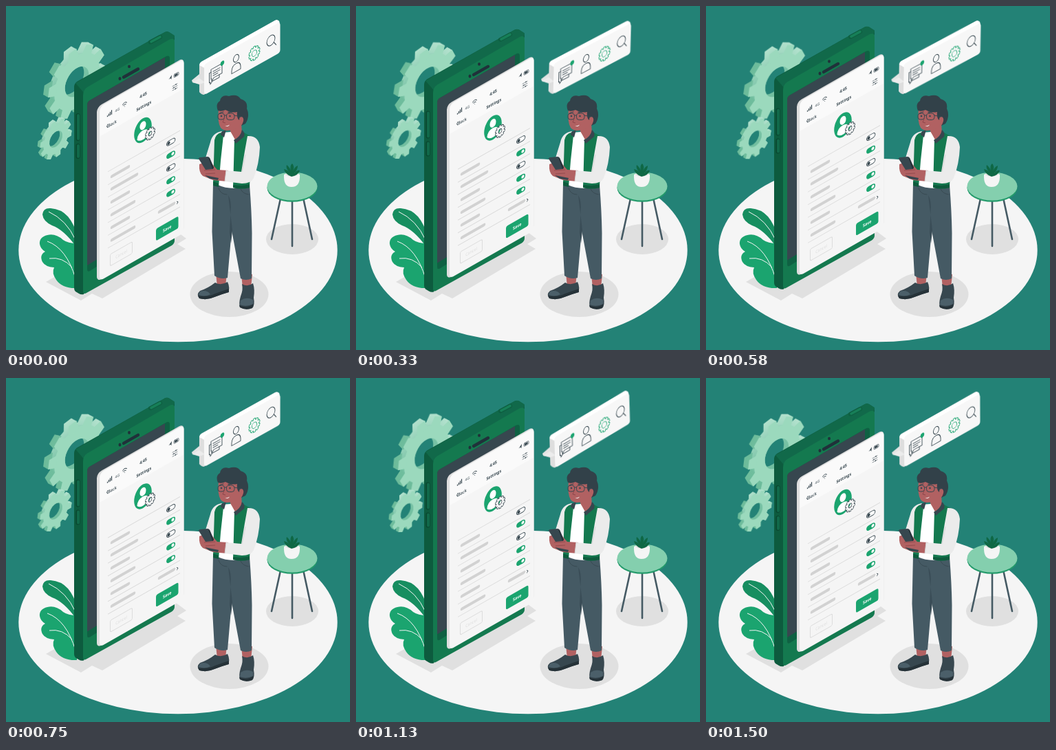
Write an HTML page without scripts that moves like this. It is 500x500 px and loops after 1.54 s.

```html
<!DOCTYPE html>
<html lang="en">
<head>
<meta charset="utf-8">
<title>Phone settings</title>
<style>
html, body { margin: 0; width: 100%; height: 100%; overflow: hidden; background: #238276; }
svg { display: block; width: 100vw; height: 100vh; }
text { font-family: "Open Sans", Lato, sans-serif; font-size: 6.2px; font-weight: 700; text-anchor: middle; fill: #37474f; }
.float { animation: float 770ms cubic-bezier(.37, 0, .63, 1) -12ms infinite alternate; }
.sway { animation: sway 770ms cubic-bezier(.37, 0, .63, 1) -385ms infinite alternate; }
.gears { transform-origin: 99px 137px; }
.bubble { transform-origin: 336px 75px; }
@keyframes float { to { transform: translateY(-8.6px); } }
@keyframes sway { from { transform: rotate(-1.6deg); } to { transform: rotate(1.6deg); } }
.line { fill: none; stroke: #37474f; stroke-linecap: round; stroke-linejoin: round; }
.skin { fill: #b16162; }
.dark { fill: #37474f; }
.green { fill: #1ba46f; }
.shade { fill: #e0e0e0; }
</style>
</head>
<body>
<svg viewBox="0 0 500 500">
<defs>
  <linearGradient id="mint" gradientUnits="userSpaceOnUse" x1="0" y1="-48" x2="0" y2="48">
    <stop stop-color="#b2e1cd"/><stop offset=".5" stop-color="#78c2a5"/><stop offset="1" stop-color="#6cbb9a"/>
  </linearGradient>
  <path id="ring" fill-rule="evenodd" d="M0-38a38 38 0 1 1 0 76a38 38 0 1 1 0-76ZM0-20a20 20 0 1 0 0 40a20 20 0 1 0 0-40Z"/>
  <path id="tooth" d="M-9-34-6.500-48H6.500L9-34ZM-9 34-6.500 48H6.500L9 34Z"/>
  <g id="cog">
    <use href="#ring"/><use href="#tooth"/>
    <use href="#tooth" transform="rotate(36)"/><use href="#tooth" transform="rotate(72)"/>
    <use href="#tooth" transform="rotate(108)"/><use href="#tooth" transform="rotate(144)"/>
  </g>
  <g id="isoCog" transform="matrix(.866 -.5 0 1 0 0)"><use href="#cog" transform="rotate(-9)"/></g>
  <g id="slab2"><use href="#isoCog"/><use href="#isoCog" x="-1" y="-.55"/></g>
  <g id="slab4"><use href="#slab2"/><use href="#slab2" x="-2" y="-1.1"/></g>
  <g id="slab8"><use href="#slab4"/><use href="#slab4" x="-4" y="-2.2"/></g>
  <g id="gear"><use href="#slab8" fill="url(#mint)"/><use href="#isoCog" fill="#9bd9bd"/></g>
  <g id="cogIcon">
    <use href="#cog" stroke="currentColor" stroke-width="10"/>
    <use href="#cog" fill="#f7f7f7"/>
  </g>
  <g id="toggleOff">
    <rect x="-6" y="-3.3" width="12.4" height="6.600" rx="3.3" fill="#fff" stroke="#37474f" stroke-width=".9"/>
    <ellipse cx="-3" rx="2.1" ry="2.3" class="dark"/>
  </g>
  <g id="toggleOn">
    <rect x="-6.4" y="-3.8" width="13" height="7.6" rx="3.8" class="green"/>
    <ellipse cx="3" rx="2.1" ry="2.3" fill="#fff"/>
  </g>
</defs>

<rect width="500" height="500" fill="#238276"/>
<ellipse cx="250" cy="355" rx="231.700" ry="133.200" fill="#f5f5f5"/>
<g class="shade">
  <path d="M58 401 100 377 246 326 262 338 249 346 261 353 140 425 125 418 109 428Z"/>
  <ellipse cx="324.500" cy="419" rx="57" ry="33"/>
  <ellipse cx="416" cy="339" rx="38" ry="22"/>
</g>

<g class="sway gears">
  <use href="#gear" transform="translate(103 110)"/>
  <use href="#gear" transform="translate(72.500 193.500) scale(.55)"/>
</g>

<g id="leaves">
  <path fill="#178e60" d="M102 350Q84 325 67 319Q54 313 53 303Q54 293 65 294Q80 295 90 306Q100 318 103 334Z"/>
  <path class="green" d="M103 345Q90 345 83 340Q72 330 60 333Q48 336 49 346Q50 353 57 357Q48 362 53 372Q57 379 70 380Q66 388 73 398Q82 411 103 410Z"/>
  <path d="M62 299Q88 311 101 340M60 342Q88 352 101 396M63 367Q82 364 96 380" fill="none" stroke="#f5f5f5"/>
</g>

<g class="float">
  <path d="M99 118Q99 113 103 110L229 39Q233 36 237 38L243 42Q245 43 245 48L113 419Q109 420 106 418L101 415Q99 413 99 410Z" fill="#0d5b3e"/>
  <path d="M101 112 229 39Q233 36 237 38L245 43 244 50 113 126Z" fill="#11694a"/>
  <path d="M112 130Q112 122 118 118L237 49Q245 45 245 53V341Q245 345 241 348L117 417Q112 420 112 414Z" fill="#14794f"/>
  <path d="M118 144Q118 139 122 137L233 73Q238 71 238 76V312L122 385Q118 387 118 383Z" fill="#0f6143"/>
  <path d="M118 144Q118 139 122 137L231 74.500V308L118 377Z" fill="#37474f"/>
  <g class="line">
    <path d="M171 103.500 192 91.500" stroke="#20313a" stroke-width="4.400"/>
    <path d="M210 52.500 224 45" style="stroke:#0e5f41" stroke-width="6"/>
    <path d="M211 52 224 45" style="stroke:#177f58" stroke-width="3.600"/>
    <path d="M104.500 159V193M104.500 203V219" style="stroke:#0a4730" stroke-width="6"/>
    <path d="M105 159V193M105 203V219" style="stroke:#11694a" stroke-width="4"/>
  </g>
  <g fill="#20313a"><ellipse cx="165.500" cy="105.500" rx="2" ry="2.500"/><ellipse cx="179" cy="88" rx="2" ry="2.300"/></g>

  <g transform="matrix(1 -.57 0 1 132 0)">
    <rect y="147" width="126.500" height="254" rx="7" fill="#dedede"/>
    <rect x="4" y="149" width="122.500" height="253" rx="6" fill="#f5f5f5"/>
    <path d="M5 192V155Q5 149 11 149H120Q126 149 126 155V192Z" fill="#fafafa"/>
    <path d="M15.500 170V168M17.500 170V166.500M19.500 170V165M21.500 170V163.500" class="line" stroke-width="1.200" style="stroke-linecap:butt"/>
    <text x="30" y="170" style="font-size:5.200px;font-weight:400">4G</text>
    <path d="M37.500 165Q40.500 161.500 43.500 165M38.800 167Q40.500 165.300 42.200 167M40.500 169V169" class="line" stroke-width=".9"/>
    <path d="M104.500 166.500 109 162.500 108.300 168.500 107 166Z" class="dark"/>
    <rect x="112" y="163.500" width="7" height="4.600" rx="1.300" class="line" stroke-width=".6"/>
    <rect x="113" y="164.300" width="4.600" height="3" class="dark"/>
    <path d="M110 179.500H117M110 182.500H117M110 185.500H117" class="line" stroke-width=".5"/>
    <path d="M115 179V180M112 182V183M114.500 185V186" class="line" stroke-width="1.100"/>
    <path d="M16 181 14.600 183.300 16 185.600" class="line" stroke-width=".9"/>
    <g transform="scale(.866 1)">
      <text x="78" y="170">4:45</text>
      <text x="78.800" y="186.300">Settings</text>
      <text x="26" y="186" style="font-weight:600">Back</text>
    </g>

    <ellipse cx="67" cy="218.700" rx="12.800" ry="17.300" class="green"/>
    <ellipse cx="67" cy="212" rx="4.500" ry="6" fill="#fff"/>
    <path d="M58.500 228Q59 219 67 219Q75 219 75.500 228Q72 232.500 67 232.500Q62 232.500 58.500 228Z" fill="#fff"/>
    <use href="#cogIcon" transform="translate(77.500 229.500) scale(.14 .17)" color="#37474f"/>

    <path d="M16 250H121M16 269H121M16 287H121M16 305.500H121M16 324H121M16 342.500H121M16 361H121" stroke="#d8d8d8" stroke-width=".9"/>
    <path d="M22 260H46M22 278H58M22 297H46M22 315.500H54M22 334H46M22 352.500H54M91 351H112" class="line" style="stroke:#d2d2d2" stroke-width="4.500"/>
    <use href="#toggleOff" x="107.500" y="259"/>
    <use href="#toggleOn" x="107.500" y="277.500"/>
    <use href="#toggleOff" x="107.500" y="296"/>
    <use href="#toggleOn" x="107.500" y="314.500"/>
    <use href="#toggleOn" x="107.500" y="333"/>
    <path d="M116.500 350.500 118 352.300 116.500 354" class="line" stroke-width=".8"/>
    <rect x="86" y="373" width="32.500" height="17.500" rx="2.500" class="green"/>
    <rect x="19.500" y="372" width="32" height="17" rx="2" fill="none" stroke="#dcdcdc"/>
    <g transform="scale(.866 1)">
      <text x="118" y="384" style="fill:#fff">Save</text>
      <text x="41" y="383" style="fill:#dcdcdc;font-weight:400">Cancel</text>
    </g>
  </g>
</g>

<g class="sway bubble">
  <path d="M281 99 270 108 271 111 281 113Z" fill="#e4e4e4"/>
  <path d="M281 86Q281 83 284 81L391 21Q394 19 397 22L398 27 288 129Q284 129 281 125Z" fill="#dedede"/>
  <path d="M281 86Q281 83 284 81L391 21Q394 19 397 22L398 27 290 91Z" fill="#fff"/>
  <path d="M271 111 281 105 289 111 281 114Z" fill="#ececec"/>
  <g transform="matrix(1 -.56 0 1 288 0)">
    <rect y="85" width="110.500" height="44.500" rx="4" fill="#f7f7f7"/>
    <g class="line" stroke-width=".9">
      <path d="M10 98H26V112H14L11 116V112H10Z"/>
      <path d="M10 102H7.500V116H9V119L12 116H22V112M13 102.500H23M13 105.500H23M13 108.500H20"/>
      <ellipse cx="46.500" cy="102" rx="4" ry="5.200"/>
      <path d="M40 121V117Q40.500 109.500 46.500 109.500Q52.500 109.500 53 117V121Z"/>
      <ellipse cx="97" cy="104.300" rx="6" ry="7.200"/><path d="M101.300 109.500 104.700 115"/>
    </g>
    <ellipse cx="26.500" cy="98" rx="2.800" ry="3.300" class="green"/>
    <use href="#cogIcon" transform="translate(73 109.500) scale(.16 .195)" color="#1ba46f"/>
    <ellipse cx="73" cy="109.500" rx="3.600" ry="4.300" fill="#f7f7f7" stroke="#1ba46f" stroke-width=".8"/>
  </g>
</g>

<g id="table">
  <path d="M399 280 386 339M416 282V349M432 279 445 339" class="line" style="stroke:#455a64" stroke-width="2.600"/>
  <ellipse cx="416" cy="264.300" rx="36.500" ry="20.500" fill="#249b6b"/>
  <ellipse cx="416" cy="262" rx="36.500" ry="20.500" fill="#84cfae"/>
  <path d="M404 245Q415 238 427 245Q428 263 415 263Q403 263 404 245Z" fill="#f5f5f5"/>
  <path d="M406 245Q415 240 425 245Q415 251 406 245Z" fill="#d9d9d9"/>
  <path d="M415 248Q405 244 404 237Q409 238 412 242Q406 235 408 231Q413 235 414 240Q412 232 416 229Q420 233 417 241Q419 234 424 232Q424 238 419 243Q424 238 427 239Q425 246 415 248Z" fill="#0f6845"/>
</g>

<g id="man">
  <path class="skin" d="M305 388H321L319 408H307ZM342 390H358L356 410H344Z"/>
  <g class="dark">
    <path d="M304 402Q312 407 322 401Q326 409 323 416Q313 419 303 423Q292 428 281 425Q276 419 282 414Q294 410 304 402Z"/>
    <path d="M343 404Q351 409 359 403Q362 412 360 424Q362 435 358 439Q349 443 340 438Q338 432 341 422Q345 412 343 404Z"/>
  </g>
  <path d="M279 421Q292 424 304 418 315 414 324 411V416Q313 419 303 423Q292 428 281 425ZM339 435Q350 440 360 433L358 439Q349 443 340 438Z" fill="#263238"/>
  <path d="M282 415Q292 412 297 419Q290 423 280 420ZM341 428Q349 422 359 427L359 433Q349 438 340 434Z" fill="#4b5f69"/>
  <path d="M301 258 354 260Q357 298 357.500 330L357 396Q349 400 341 396L328 326 322 395Q312 398 303 392L299.500 328Z" fill="#455a64"/>
  <path d="M323 275Q328 282 326.500 300L325 330 327 345 329 326Z" fill="#3a4d57"/>
  <path d="M309 265Q312 274 321 274M341 266Q344 273 353 274" class="line" stroke-width=".8"/>

  <path d="M314 182Q300 184 297 198L289 224 298 238 308 230 316 194Z" fill="#ebebeb"/>
  <path d="M314 184 340 182 345 264Q322 267 308 260Z" fill="#fff"/>
  <path d="M312 184Q305 186 303 195L301 260 309 263 312 225 316 188ZM332 194 346 184 357 190 354 264Q342 267 330 264Z" fill="#14794f"/>
  <path d="M301 255 309 258V263L301 261ZM330 260Q343 262 354 259V264Q342 267 330 264Z" fill="#0e5b3d"/>
  <path class="skin" d="M327 168H342L343 188 334 196 326 182Z"/>
  <path class="dark" d="M343 180Q348 184 346 190L334 200 331 195Q341 190 343 180ZM313 183 320 180 317 191 312 187Z"/>

  <path class="skin" d="M281 230Q280 242 286 247L301 253 321 255 323 239 307 238 300 230 289 227Z"/>
  <path d="M351 189Q367 188 369 205Q368 230 360 250Q356 258 343 258L318 255 320 239 342 241 347 211Z" fill="#ebebeb"/>
  <path d="M343 241 348 216M320 239 318 255" fill="none" stroke="#d5d5d5"/>
  <path class="dark" d="M280 222Q280 220 283 220L293 219Q295 219 296 221L302 235Q302 237 300 237L290 238Z"/>
  <path d="M296 221 302 235 300 237 294 220Z" fill="#263238"/>
  <path d="M288 239 304 238M290 244 304 243" fill="none" stroke="#944c4f" stroke-width="1.200"/>
  <path class="dark" d="M289 246 309 250 308 253 296 251Z"/>

  <path class="skin" d="M309 150Q307 169 312 177Q318 184 333 179L342 173Q351 171 349 162Q345 156 340 162L337 147Z"/>
  <path d="M308 152Q304 142 311 138Q313 128 324 131Q336 127 341 135Q352 138 350 149Q355 160 348 171L342 174Q348 164 343 161Q339 160 339 166Q335 163 336 154Q328 156 319 151Q313 154 308 152Z" fill="#324149"/>
  <path d="M311 155.500 316 154M323 154.500 329 154" class="line" stroke-width="1.300"/>
  <g class="line" stroke-width="1">
    <rect x="308" y="156" width="9.500" height="9" rx="3.500"/>
    <rect x="320.500" y="156" width="11.500" height="9.500" rx="3.800"/>
    <path d="M317.500 159H320.500M332 159 342 161"/>
  </g>
  <g class="dark"><circle cx="313" cy="160" r="1.300"/><circle cx="325.500" cy="160" r="1.300"/></g>
  <path d="M318 162 315 169 319 170" fill="none" stroke="#8e464b"/>
  <path d="M318 174Q322 175 325 172.500Q323.500 176.500 318 174Z" fill="#fff"/>
</g>
</svg>
</body>
</html>
```
